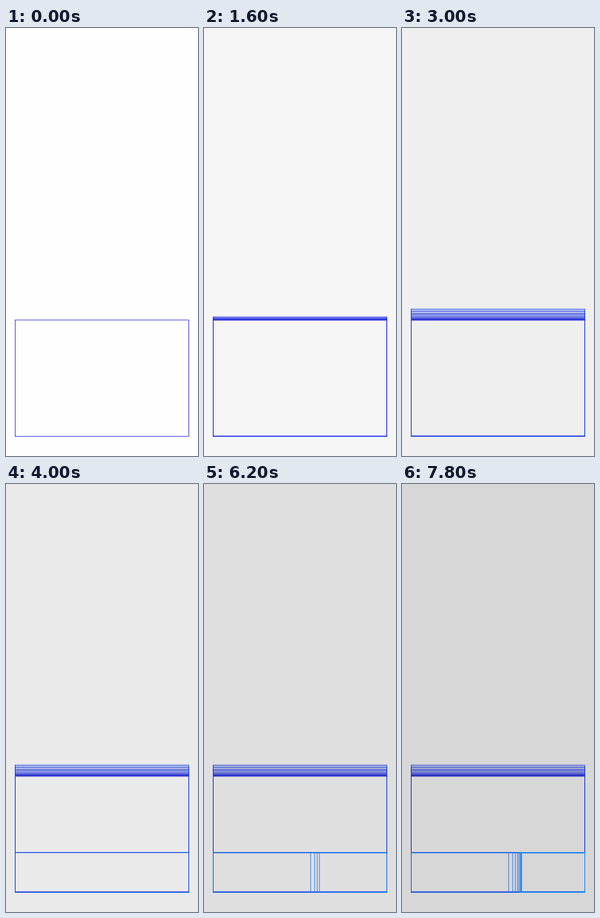
An HTML page with a canvas that plays this animation: 240x535 px, repeating every 8 s.

```html
<!DOCTYPE html>
<html lang="en">
<head>
<meta charset="utf-8">
<title>Splitting frames</title>
<style>
  html, body { margin: 0; width: 100%; height: 100%; overflow: hidden; background: #fefefe; }
  canvas { display: block; }
</style>
</head>
<body>
<canvas width="240" height="535"></canvas>
<script>
const ctx = document.querySelector('canvas').getContext('2d');
const STEP = 200, STEPS = 40;
const LEFT = 11.4, RIGHT = 228.5, TOP = 365, SPLIT = 460.7, BOTTOM = 510.3;
const RISE_END = 15, SLIDE_START = 28;

// Top-left corner of the rectangle stroked at a given step
function corner(step) {
  if (step <= RISE_END) return [LEFT, TOP - 13.8 * (step / RISE_END) ** 2];
  if (step < SLIDE_START) return [LEFT, SPLIT];
  return [150 - 16.8 * 0.7 ** (step - SLIDE_START), SPLIT];
}

function inkColor(step, age) {
  const dim = 1 - age / 254;
  const [r, g, b] = [32, 28 + 3 * step, 222 + 0.6 * step].map(v => Math.round(v * dim));
  return `rgb(${r},${g},${b})`;
}

function draw(step) {
  const shade = 254 - step;
  ctx.fillStyle = `rgb(${shade},${shade},${shade})`;
  ctx.fillRect(0, 0, 240, 535);
  ctx.lineWidth = 0.7;
  for (let i = 0; i <= step; i++) {
    const [x, y] = corner(i);
    ctx.strokeStyle = inkColor(i, step - i);
    ctx.strokeRect(x, y, RIGHT - x, BOTTOM - y);
  }
}

let shown = -1;
const start = performance.now();
function tick() {
  const step = Math.floor((performance.now() - start) / STEP) % STEPS;
  if (step !== shown) draw(shown = step);
  requestAnimationFrame(tick);
}
tick();
</script>
</body>
</html>
```
